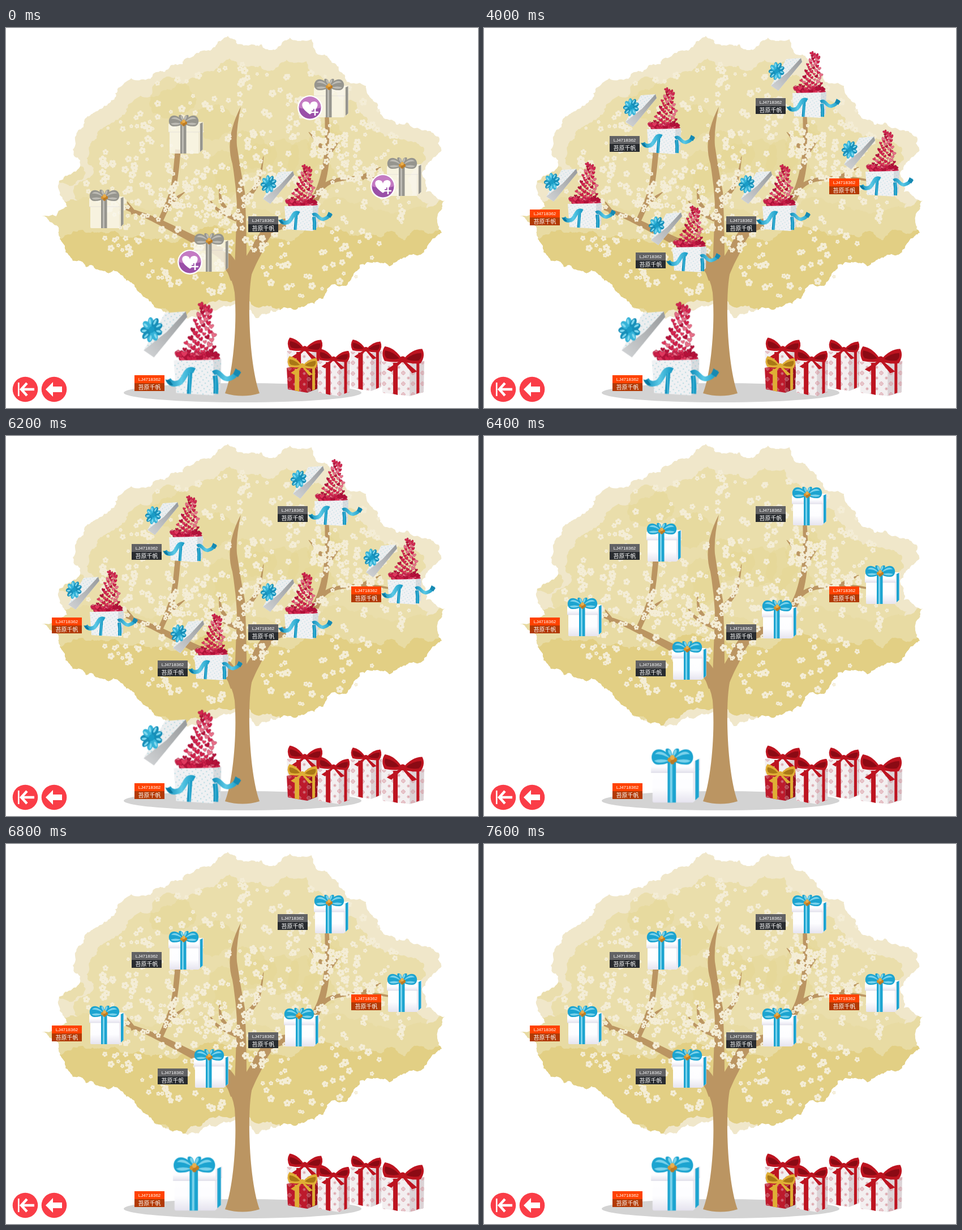
These frames come from a looping animation (834x672 px, 9.6 s). An HTML page:

```html
<!DOCTYPE html>
<html lang="ja">
<head>
<meta charset="utf-8">
<title>Gift tree</title>
<style>
html, body { margin: 0; width: 100%; height: 100%; overflow: hidden; background: #fff; }
svg { display: block; width: 834px; height: 672px; }
.to2, .to4, .mid, .from2, .from4, .open, .shut { animation: 9600ms step-end infinite; }
.to2 { animation-name: to2; }
.to4 { animation-name: to4; }
.mid { animation-name: mid; }
.from2 { animation-name: from2; }
.from4 { animation-name: from4; }
.open { animation-name: open; }
.shut { animation-name: shut; }
@keyframes to2 { 0% { opacity: 1 } 20.8333%, 100% { opacity: 0 } }
@keyframes to4 { 0% { opacity: 1 } 41.6666%, 100% { opacity: 0 } }
@keyframes mid { 0%, 41.6666%, 100% { opacity: 0 } 20.8333% { opacity: 1 } }
@keyframes from2 { 0% { opacity: 0 } 20.8333%, 100% { opacity: 1 } }
@keyframes from4 { 0% { opacity: 0 } 41.6666%, 100% { opacity: 1 } }
@keyframes open {
  0%, 64.5833%, 68.75%, 72.9166%, 77.0833% { opacity: 1 }
  62.5%, 66.6666%, 70.8333%, 75%, 79.1666%, 100% { opacity: 0 }
}
@keyframes shut {
  0%, 64.5833%, 68.75%, 72.9166%, 77.0833% { opacity: 0 }
  62.5%, 66.6666%, 70.8333%, 75%, 79.1666%, 100% { opacity: 1 }
}
text { fill: #fff; text-anchor: middle; }
.id { font: 8px "Liberation Sans", Arial, sans-serif; }
.who { font: 10px "Noto Sans CJK JP", "Noto Sans CJK", sans-serif; }
</style>
</head>
<body>
<svg id="stage" viewBox="0 0 834 672" xmlns="http://www.w3.org/2000/svg">
  <defs>
    <linearGradient id="white" x2="0" y2="1">
      <stop stop-color="#fff"/><stop offset=".6" stop-color="#fdfdff"/><stop offset="1" stop-color="#e6e4ef"/>
    </linearGradient>
    <linearGradient id="blue">
      <stop stop-color="#1592bd"/><stop offset=".5" stop-color="#5cc9e6"/><stop offset="1" stop-color="#1a9cc6"/>
    </linearGradient>
    <linearGradient id="lidEdge" x1="1" y1="0" x2="0" y2="1">
      <stop stop-color="#96999b"/><stop offset="1" stop-color="#d3d5d7"/>
    </linearGradient>
    <pattern id="dots" width="7" height="7" patternUnits="userSpaceOnUse" patternTransform="rotate(12)">
      <g fill="#7cc3d2"><circle cx="2" cy="2" r=".6"/><circle cx="5.5" cy="5.5" r=".6"/></g>
    </pattern>
    <pattern id="flakes" width="17" height="19" patternUnits="userSpaceOnUse">
      <g fill="none" stroke="#d58b95" stroke-width=".7">
        <circle cx="5" cy="5" r="3"/><path d="M5 1v8M1 5h8M11 14h6M14 11v6M12 12l4 4M16 12l-4 4"/>
      </g>
    </pattern>
    <clipPath id="crownClip"><path id="crownShape"/></clipPath>
  </defs>
</svg>
<script>
const stage = document.getElementById('stage');
const ID = 'LJ4718362', NAME = '苔原千帆', BARK = '#bb9562';

let seed = 7;
function rnd() {
  seed = seed + 0x6D2B79F5 | 0;
  let t = Math.imul(seed ^ seed >>> 15, 1 | seed);
  t = t + Math.imul(t ^ t >>> 7, 61 | t) ^ t;
  return ((t ^ t >>> 14) >>> 0) / 4294967296;
}
const spread = () => rnd() + rnd() + rnd() - 1.5;
const fix = n => +n.toFixed(1);
const times = (n, f) => Array.from({ length: n }, (_, i) => f(i));
const points = text => text.trim().split(/\s+/).map(p => p.split(',').map(Number));
const outline = pts => 'M' + pts.map(p => p.map(fix).join(' ')).join('L') + 'Z';
const path = (d, fill, more = '') => `<path d="${d}" fill="${fill}" ${more}/>`;
const line = (d, color, w) => path(d, 'none', `stroke="${color}" stroke-width="${w}"`);
const disc = (x, y, r, fill) => `<circle cx="${x}" cy="${y}" r="${r}" fill="${fill}"/>`;
const rect = (x, y, w, h, fill) => `<rect x="${x}" y="${y}" width="${w}" height="${h}" fill="${fill}"/>`;
const at = (x, y, body, more = '') => `<g transform="translate(${x} ${y}) ${more}">${body}</g>`;
const mirror = body => body + `<g transform="scale(-1 1)">${body}</g>`;
const layer = (cls, body) => `<g class="${cls}">${body}</g>`;

// Midpoint displacement gives the leafy edge
function leafy(a, b) {
  const dx = b[0] - a[0], dy = b[1] - a[1];
  if (Math.hypot(dx, dy) < 4) return [a];
  const k = (rnd() - .5) * .42;
  const m = [(a[0] + b[0]) / 2 - dy * k, (a[1] + b[1]) / 2 + dx * k];
  return [...leafy(a, m), ...leafy(m, b)];
}
const ragged = pts => outline(pts.flatMap((p, i) => leafy(p, pts[(i + 1) % pts.length])));
const blob = (x, y, rx, ry) => ragged(times(9, i => [
  x + rx * Math.cos(i * .698) * (.8 + rnd() * .4), y + ry * Math.sin(i * .698) * (.8 + rnd() * .4)]));

function crown() {
  const shape = ragged(points(`392,14 431,30 470,39 540,20 550,46 580,62 602,95 655,132 661,152 724,177
    764,192 769,214 745,241 735,258 742,290 775,305 770,362 744,388 710,403 640,414 601,456 545,488 500,495
    441,513 385,491 340,512 270,496 222,450 190,428 104,390 63,333 108,316 94,270 131,234 118,215 140,160
    198,106 250,90 312,64 361,40`));
  document.getElementById('crownShape').setAttribute('d', shape);
  const ground = (y, color) => path(ragged([[0, 540], ...times(14, i =>
    [i * 64, y + 12 * Math.sin(i * 1.9)]), [834, 540]]), color);
  const patches = times(12, () => path(blob(425 + spread() * 230, 215 + spread() * 80, 20 + rnd() * 25, 18 + rnd() * 25),
    '#e6d795', 'opacity=".55"')).join('');
  return '<g clip-path="url(#crownClip)">' + rect(0, 0, 834, 672, '#f0e7ca') +
    path(shape, '#eadeab', 'transform="translate(428 345) scale(.92 .88) translate(-428 -345)"') +
    patches + ground(312, '#e8dba3') + ground(365, '#e2cf84') + '</g>';
}

// Smooth curve through a few points
function curve(pts) {
  const get = i => pts[Math.max(0, Math.min(pts.length - 1, i))];
  return times((pts.length - 1) * 8 + 1, n => {
    const i = Math.min(n >> 3, pts.length - 2), t = n / 8 - i;
    return [0, 1].map(k => {
      const [a, b, c, d] = [-1, 0, 1, 2].map(j => get(i + j)[k]);
      return b + t * (c - a + t * (2 * a - 5 * b + 4 * c - d + t * (3 * (b - c) + d - a))) / 2;
    });
  });
}

function taper(pts, w0, w1) {
  const last = pts.length - 1;
  const side = sign => pts.map(([x, y], i) => {
    const a = pts[Math.max(0, i - 1)], b = pts[Math.min(last, i + 1)];
    const dx = b[0] - a[0], dy = b[1] - a[1];
    const k = sign * (w0 + (w1 - w0) * i / last) / 2 / Math.hypot(dx, dy);
    return [x - dy * k, y + dx * k];
  });
  return outline([...side(1), ...side(-1).reverse()]);
}

const boughs = [
  ['408,442 385,402 332,374 258,337 208,318', 24, 4],
  ['420,438 438,402 467,356 520,335 553,288 567,225 567,155', 24, 7],
  ['272,343 295,285 304,215', 9, 10],
  ['556,284 580,270 632,264 684,270', 9, 3]
];
const twigs = `226,328 214,307|286,312 316,290|628,265 662,246|564,218 535,184|567,227 592,194|
  420,306 445,275 455,227|408,338 375,322 359,302|393,328 380,305 377,281`;
const limbs = [...boughs, ...twigs.split('|').map(t => [t, 10, 1])].map(([t, ...w]) => [curve(points(t)), ...w]);

const tree = () => path(limbs.map(l => taper(...l)).join(''), BARK) +
  path('M387 646C400 615 409 530 404 468Q400 442 387 426L404 424Q407 350 408 310Q406 275 400 240Q386 195 415 139Q406 180 408 208Q414 250 422 290Q425 350 425 406L440 414Q431 435 430 485C429 540 435 610 448 646Q418 655 387 646Z', BARK);

function blossoms() {
  const scattered = times(400, () => {
    const a = rnd() * 6.283, r = Math.sqrt(rnd());
    return [430 + Math.cos(a) * r * 290, 275 + Math.sin(a) * r * 218];
  });
  const clustered = times(210, () => {
    const pts = limbs[rnd() * limbs.length | 0][0];
    const [x, y] = pts[rnd() * pts.length | 0];
    return [x + spread() * 32, y + spread() * 26];
  });
  const dot = (x, y, r) => `M${fix(x - r)} ${fix(y)}a${r} ${r} 0 1 0 ${2 * r} 0a${r} ${r} 0 1 0 ${-2 * r} 0`;
  let petals = '', centres = '';
  for (const [x, y] of [...scattered, ...clustered]) {
    const size = 1.7 + rnd() * 2.5, turn = rnd() * 6;
    if (x > 385 && x < 448 && y > 395) continue;
    for (let a = turn; a < turn + 6.2; a += 1.2566) {
      petals += dot(x + Math.cos(a) * size, y + Math.sin(a) * size, fix(size * .7));
    }
    if (size > 3) centres += dot(x, y, .6);
  }
  return path(petals, '#f4edd6') + path(centres, '#e5d69c');
}

// Bow about 52 wide, centred on its knot
function bow(x, y, dark, light, knot) {
  const loop = path('M0 1C-6-11-18-16-24-9C-29-2-25 8-17 7C-10 7-5 5 0 2Z', dark) +
    path('M-3-1C-9-9-18-12-22-6C-15-7-9-4-3-1ZM-4 2Q-15-1-23 2Q-18 7-4 2Z', light) +
    path('M0 0Q-11-8-8-13Q-1-15 0-3Z', dark) + path('M-1-3Q-7-8-5-12Q-1-12-1-3Z', light);
  return at(x, y, mirror(loop) + knot);
}
const gold = disc(-3, 1, 3, '#d6922f') + disc(3, 1, 3, '#c27d20') + disc(0, -2, 3, '#eaae4c') + disc(0, 4, 2.6, '#b87926');

function closedGift(dark, light, face, side, fade) {
  const box = path('M2 24H53V68H4Q2 68 2 66Z', face) + path('M53 24L61 20V61L53 68Z', side) +
    path('M0 16L8 12H61L54 16V30H0Z', face) + path('M54 16L62 12V26L54 30Z', side) +
    line('M0 30H54L62 26', '#d8d8e2', .7);
  return `<g opacity="${fade}">${box}</g>` + rect(21, 14, 10.5, 54, dark) + rect(24, 14, 3, 54, light) +
    path('M56 15L60.5 13V61L56 65Z', dark) + bow(27, 13, dark, light, gold);
}

const HEART = 'M0 .9C-1.4-.1-1.2-1-.55-1Q-.1-1 0-.5Q.1-1 .55-1C1.2-1 1.4-.1 0 .9Z';
function hearts() {
  const reds = ['#cf1f49', '#b5113a', '#e0375e', '#e9718a', '#d42650'];
  const one = (x, y, s) => path(HEART, reds[rnd() * 5 | 0], `stroke="#8e0d2e" stroke-width=".1" transform="translate(${fix(x)} ${fix(y)}) rotate(${fix(rnd() * 60 - 30)}) scale(${fix(s)})"`);
  // Golden-ratio steps keep the column evenly filled
  const column = times(48, i => {
    const t = i / 47, u = i * .618 % 1 - .5;
    return one(32 + 9 * t + u * (48 - 36 * t), 15 - 60 * t ** 1.25, 2.2 + rnd() * 1.2);
  });
  const pile = times(34, i => one(6 + i * .618 % 1 * 51, 16 + rnd() * 9, 3.5 + rnd()));
  return [...column.reverse(), ...pile].join('');
}

function openGift() {
  const front = 'M1 25L51 24V69L4 66Z', side = 'M51 24L61 23L60 62L51 69Z';
  const top = 'M-37 12L-10-35L16-37L18-30L-24 21Z';
  const curl = (d, w) => line(d, 'url(#blue)', w);
  const rosette = times(9, i => `<ellipse cx="9" rx="6.5" ry="4" fill="${i % 2 ? '#35b3d8' : '#178fb9'}" transform="rotate(${i * 80})"/>` +
    `<ellipse cx="10" cy="-1" rx="3.5" ry="1.4" fill="#83d9ef" transform="rotate(${i * 80})"/>`).join('') + disc(0, 0, 4, '#1a9cc6');
  return hearts() +
    path(front, '#f0f1f3') + path(side, '#d8dbde') + path(front + side, 'url(#dots)') +
    path(top, '#eceeef') + path(top, 'url(#dots)') +
    path('M-37 12L-24 21L18-30L16-37L-8-11Z', 'url(#lidEdge)') +
    at(-27, -14, rosette, 'rotate(20) scale(.9 1.05)') +
    curl('M22 40L20 67', 5) + curl('M27 38C16 32 16 48 8 53Q-2 57-6 49', 7) +
    path('M-10 49L-4 56L0 56L-4 50Z', '#0c789f') +
    curl('M54 67Q55 55 53 44', 6) + curl('M51 41C59 35 61 50 70 48Q79 46 82 37', 6) +
    path('M79 35L86 40L82 46L76 42Z', '#1689b2');
}

const PLUS = 'M9 2V14M3 8H15';
const badge = disc(0, 0, 22, '#fff') + disc(0, 0, 19.5, '#9a50a8') +
  path('M-19.5 0A19.5 19.5 0 0 1 19.5 0Q0 6-19.5 0Z', '#c47bc3') +
  path(HEART, '#fff', 'transform="translate(0 1) scale(13 12)"') + line(PLUS, '#9a50a8', 6) + line(PLUS, '#fff', 2.6);

const label = (x, y, red) => at(x, y,
  rect(0, 0, 53, 14, red ? '#ff4200' : '#626264') + rect(0, 14, 53, 14, red ? '#b23a05' : '#292c30') +
  `<text class="id" x="26.5" y="10.3">${ID}</text><text class="who" x="26.5" y="25">${NAME}</text>`);

function present(x, y, w, h, [face, shade, ribbon, dark, mark]) {
  const f = w * .66, mid = w * .33;
  const front = `M0 4L${f} 8V${h}L2 ${h - 6}Z`, side = `M${f} 8L${w} 3L${w - 1} ${h - 7}L${f} ${h}Z`;
  const half = path('M0 1Q-12-16-27-17Q-33-7-26 4Q-12 6 0 3Z', ribbon) +
    path('M-5-1Q-14-10-26-11Q-28-4-23 0Q-13 2-5-1Z', dark) +
    path('M-3-1Q-15-13-27-17Q-14-9-3-1ZM-2 1L-22 16L-15 19L0 3Z', ribbon);
  return at(x, y, path(`M0 4L${w * .4} 0L${w} 3L${f} 8Z`, face) + path(front, face) + path(side, shade) +
    path(front + side, mark) + path(`M${mid - 4} 6h8V${h - 2}L${mid - 4} ${h - 4}Z`, ribbon) +
    path(`M${w * .82} 5h5V${h - 6}L${w * .82} ${h - 4}Z`, ribbon) +
    at(w / 2, 0, mirror(half) + disc(0, 0, 4.5, ribbon), `rotate(4) scale(${w / 62})`));
}

function pile() {
  const paper = ['#f3eff0', '#dcd3d6', '#bd1420', '#8b0a14', 'url(#flakes)'];
  const small = ['#bd1a2c', '#96101f', '#dfae35', '#a97716', 'url(#flakes)'];
  return present(496, 567, 64, 56, paper) + present(608, 568, 56, 74, paper) +
    present(550, 585, 58, 66, paper) + present(663, 586, 76, 65, paper) + present(496, 597, 55, 48, small);
}

const nav = () => disc(34, 639, 22.3, '#fa3d47') + disc(85, 639, 22.3, '#fa3d47') +
  rect(21, 627, 2.6, 24, '#fff') + line('M37 628L27 639L37 650M27 639H50', '#fff', 4.5) +
  path('M70 639L83 626V634H99V644H83V652Z', '#fff');

// x, y, label x, label y, red label, opening step, badge span, size
const gifts = [
  [147, 286, 81, 321, 1, 'from4', 'mid'],
  [287, 154, 222, 191, 0, 'from4', 'mid'],
  [332, 363, 268, 397, 0, 'from2', 'to2'],
  [491, 290, 428, 333, 0, '', ''],
  [544, 90, 480, 124, 0, 'from4', 'to4'],
  [673, 229, 610, 266, 1, 'from4', 'to4'],
  [295, 553, 227, 614, 1, '', '', 1.4]
];
const opened = openGift();
const shut = closedGift('#1ca4d0', '#7bd2eb', 'url(#white)', '#e9e9f1', 1);
const ghost = closedGift('#96958e', '#bdbbb4', '#fbf8ee', '#f1ecdc', .8);

function gift([x, y, lx, ly, red, start, span, size = 1]) {
  const wait = start ? layer(start.replace('from', 'to'), at(x, y, ghost)) + layer(span, at(x - 7, y + 51, badge)) : '';
  const both = at(x, y, layer('open', opened) + layer('shut', shut), `scale(${size})`);
  return wait + layer(start, both + label(lx, ly, red));
}

stage.insertAdjacentHTML('beforeend',
  crown() + '<ellipse cx="418" cy="645" rx="210" ry="17" fill="#d3d3d3"/>' +
  tree() + blossoms() + pile() + gifts.map(gift).join('') + nav());
</script>
</body>
</html>
```
